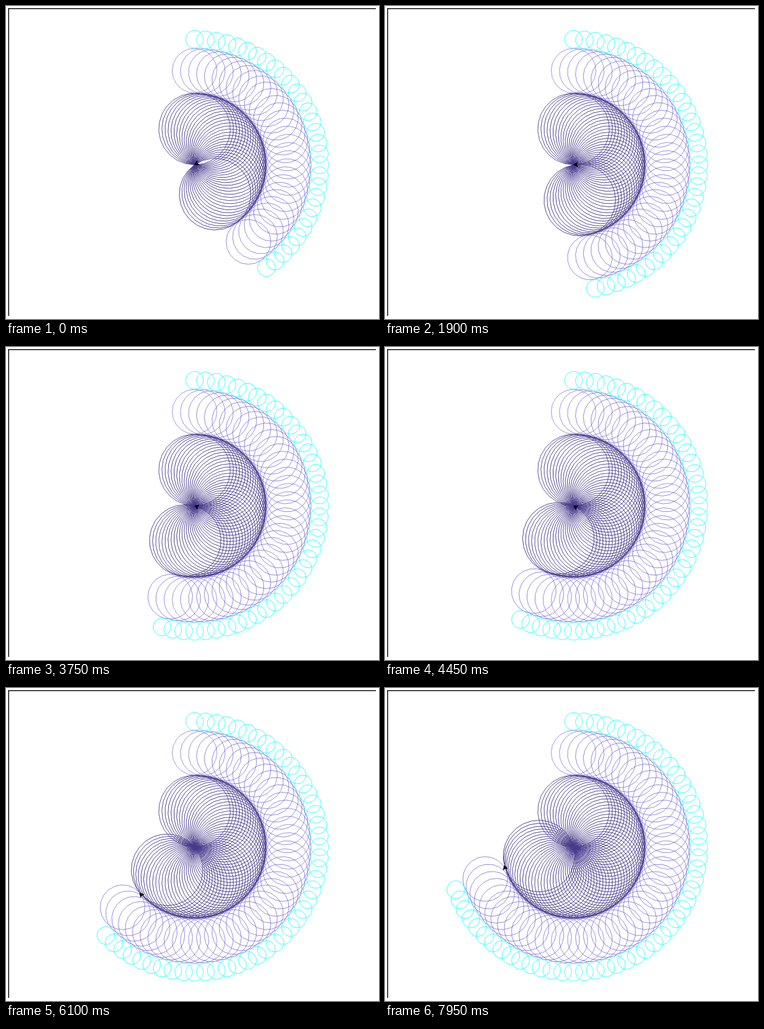
Recreate the animation shown at these times as an HTML page with a canvas. Size 600 by 503 pixels, loop 8000 ms.

```html
<!DOCTYPE html>
<html lang="en">
<head>
<meta charset="utf-8">
<title>Turtle circles</title>
<style>
  html, body { margin: 0; width: 100%; height: 100%; overflow: hidden; background: #fff; }
  canvas { display: block; width: 600px; height: 503px; }
</style>
</head>
<body>
<canvas id="stage" width="600" height="503"></canvas>
<script>
const ctx = document.getElementById('stage').getContext('2d');
const LOOP = 8000, TICK = 50, SCALE = 0.72, TURN = Math.PI / 36;

// Each ring: where its circles start, their radius, side count and pen.
const RINGS = [
  { start: 0,   radius: 80, sides: 25, color: '#483d8b', width: 1.2 },
  { start: 160, radius: 50, sides: 20, color: '#6a5acd', width: 0.9 },
  { start: 260, radius: 20, sides: 15, color: '#00ffff', width: 1 }
];

// [time in ms, turns completed]: the turtle's pace is slightly uneven.
const PACE = [
  [0, 30.06], [1000, 32.87], [2750, 37.3], [3750, 40.05],
  [5250, 44.37], [7100, 49.12], [8000, 51.53]
];

function turnsAt(time) {
  const i = PACE.findIndex(([t]) => t > time);
  const [t0, a] = PACE[i - 1], [t1, b] = PACE[i];
  return a + (b - a) * (time - t0) / (t1 - t0);
}

function drawCircle({ start, radius, sides, color, width }) {
  ctx.beginPath();
  for (let i = 0; i < sides; i++) {
    const a = i * 2 * Math.PI / sides;
    ctx.lineTo(radius * Math.sin(a), -start - radius + radius * Math.cos(a));
  }
  ctx.closePath();
  ctx.strokeStyle = color;
  ctx.lineWidth = width;
  ctx.stroke();
}

function drawTurtle(distance) {
  ctx.translate(0, -distance);
  ctx.beginPath();
  ctx.moveTo(0, 0);
  ctx.lineTo(-9, -5);
  ctx.lineTo(-7, 0);
  ctx.lineTo(-9, 5);
  ctx.closePath();
  ctx.fillStyle = ctx.strokeStyle = '#000';
  ctx.lineWidth = 1;
  ctx.fill();
  ctx.stroke();
}

function atTurn(turn, draw) {
  ctx.save();
  ctx.translate(303.3, 255.2);
  ctx.scale(SCALE, SCALE);
  ctx.rotate(turn * TURN);
  draw();
  ctx.restore();
}

function render(time) {
  const turns = turnsAt(time);
  const current = Math.floor(turns);
  const phase = (turns - current) * RINGS.length;

  ctx.fillStyle = '#fff';
  ctx.fillRect(0, 0, 600, 503);
  ctx.fillStyle = '#000';
  ctx.fillRect(3.6, 3.6, 591.4, 1.4);
  ctx.fillRect(3.6, 3.6, 1.4, 494.4);

  for (let turn = 0; turn <= current; turn++) {
    // A circle appears halfway through the turtle's stay at its ring.
    const done = turn < current ? RINGS.length : Math.floor(phase + 0.5);
    atTurn(turn, () => RINGS.slice(0, done).forEach(drawCircle));
  }
  atTurn(current, () => drawTurtle(RINGS[Math.floor(phase)].start));
}

let lastTick = -1;
function frame() {
  const tick = Math.floor(performance.now() % LOOP / TICK);
  if (tick !== lastTick) render(tick * TICK);
  lastTick = tick;
  requestAnimationFrame(frame);
}
frame();
</script>
</body>
</html>
```
